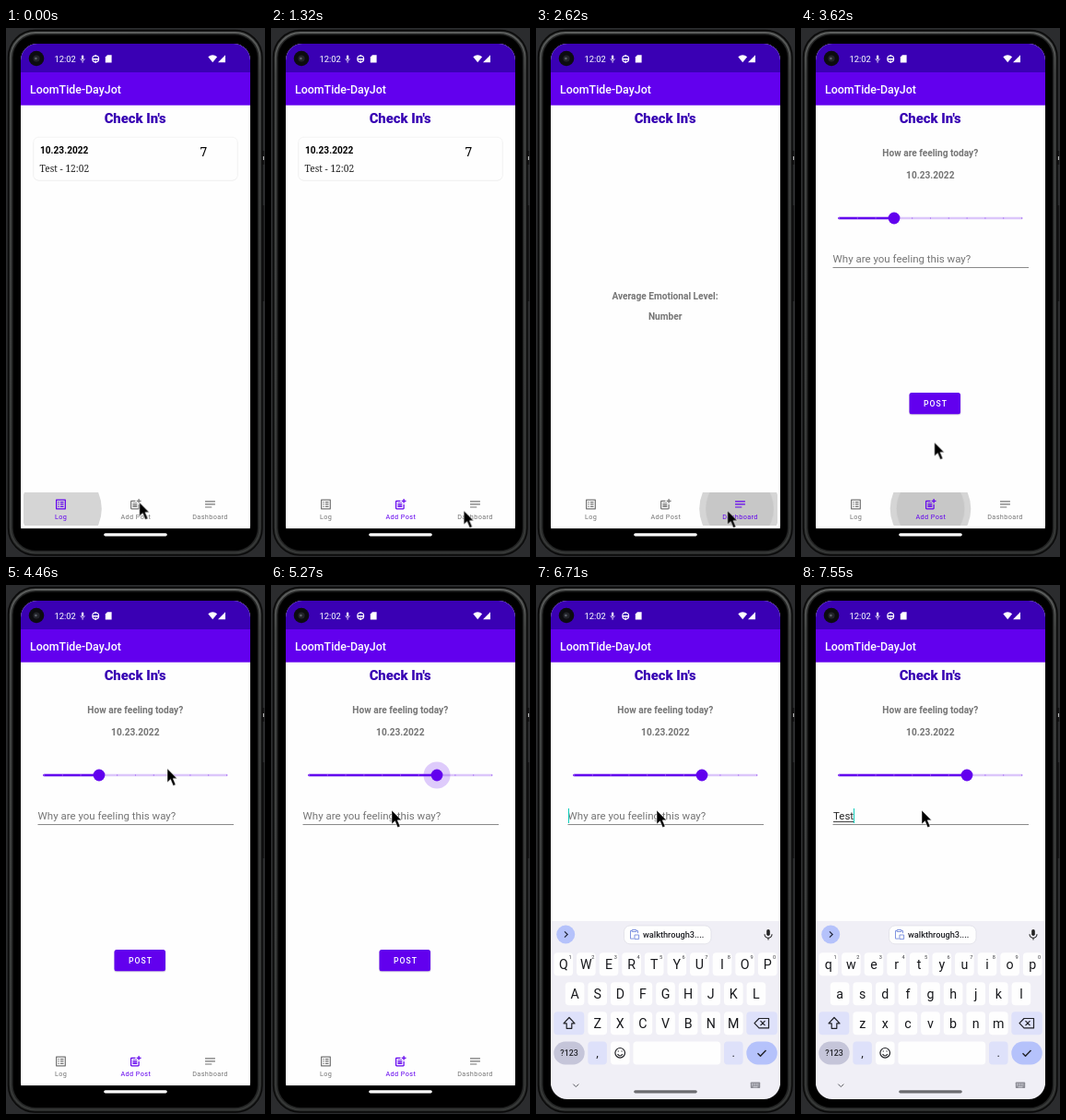
An HTML page for the animation above (8 s loop, 281 by 573 pixels).

```html
<!DOCTYPE html>
<html lang="en">
<head>
<meta charset="utf-8">
<title>Check In's</title>
<style>
html, body { margin: 0; width: 100%; height: 100%; overflow: hidden; background: #2b2c2e; }
body { position: relative; font-family: Roboto, "Open Sans", sans-serif; }
#stage { display: block; position: absolute; left: 0; top: 0; width: 281px; height: 573px; }
text { font-family: Roboto, "Open Sans", sans-serif; }
.mid { text-anchor: middle; }
.bold { font-weight: 700; font-size: 10.15px; }
.gray { fill: #757575; }
.serif { font-family: "Noto Serif", serif; }

.step { animation: 8s step-end infinite; }
.flow { animation: 8s linear infinite; }

/* pages */
#list { animation-name: list; }
#form { animation-name: form; }
#dash { animation-name: dash; }
@keyframes list { 0% { opacity: 1 } 18.125%, 100% { opacity: 0 } }
@keyframes form { 0% { opacity: 0 } 18.125% { opacity: 1 } 31.25% { opacity: 0 } 43.75%, 100% { opacity: 1 } }
@keyframes dash { 0% { opacity: 0 } 31.25% { opacity: 1 } 43.75%, 100% { opacity: 0 } }

/* bottom tabs */
.tab { fill: currentColor; color: #757575; }
.tab text { font-size: 7.27px; letter-spacing: .4px; text-anchor: middle; }
#tabLog { animation-name: tabLog; }
#tabAdd { animation-name: tabAdd; }
#tabDash { animation-name: tabDash; }
@keyframes tabLog { 0% { color: #6200ee } 11.75%, 100% { color: #757575 } }
@keyframes tabAdd { 0% { color: #757575 } 11.75% { color: #6200ee } 27.875% { color: #757575 } 42.5%, 100% { color: #6200ee } }
@keyframes tabDash { 0% { color: #757575 } 27.875% { color: #6200ee } 42.5%, 100% { color: #757575 } }

/* touch ripples */
.ripple { opacity: 0; animation: ripple 8s linear infinite; animation-delay: calc(var(--at) - 8s); }
.ripple circle { fill: #d5d5d5; }
.ripple .wave { fill: #c7c7c7; transform-box: fill-box; transform-origin: center; animation: wave 8s linear infinite; animation-delay: calc(var(--at) - 8s); }
#firstRipple { animation-name: lastFade; }
@keyframes ripple { 0% { opacity: 0 } .4%, 3.8% { opacity: 1 } 6%, 100% { opacity: 0 } }
@keyframes wave { 0% { transform: scale(.58) } 2.4%, 100% { transform: scale(1) } }
@keyframes lastFade { 0%, 1.5% { opacity: 1 } 3.375%, 100% { opacity: 0 } }

/* slider */
#active { animation-name: active; }
#thumb { animation-name: thumb; }
#halo { animation-name: halo; }
@keyframes active { 0% { width: 60px } 58.75%, 100% { width: 139px } }
@keyframes thumb { 0% { transform: translate(101px, 206px) } 58.75%, 100% { transform: translate(180px, 206px) } }
@keyframes halo { 0% { opacity: 0 } 58.75% { opacity: .2 } 67.75%, 100% { opacity: 0 } }

/* text field */
#hint { animation-name: hint; }
@keyframes hint { 0% { opacity: 1 } 85.375%, 100% { opacity: 0 } }
#field { position: absolute; left: 35px; top: 241.5px; height: 16px; display: flex; font-size: 11.5px; line-height: 16px; color: #262626; }
#word { height: 14px; border-bottom: 1px solid #444; }
#word span { animation: 8s step-end infinite; }
#caret { width: 1.3px; height: 16px; background: #10cdbb; animation-name: caret; }
@keyframes caret { 0% { opacity: 0 } 67.75%, 100% { opacity: 1 } }
@keyframes key1 { 0% { font-size: 0 } 85.375%, 100% { font-size: 11.5px } }
@keyframes key2 { 0% { font-size: 0 } 88.375%, 100% { font-size: 11.5px } }
@keyframes key3 { 0% { font-size: 0 } 91.375%, 100% { font-size: 11.5px } }
@keyframes key4 { 0% { font-size: 0 } 94.3%, 100% { font-size: 11.5px } }

/* keyboard */
#keyboard { animation-name: rise; }
@keyframes rise {
  0%, 73.1% { transform: translateY(193px); opacity: 0 }
  74.3%, 75.3% { transform: translateY(107px); opacity: .4 }
  76.6% { transform: translateY(32px); opacity: .85 }
  78.5%, 100% { transform: translateY(0); opacity: 1 }
}
.abc { font-size: 14.2px; text-anchor: middle; fill: #17181c; animation: caps 8s step-end infinite; }
.num { font-size: 5.6px; text-anchor: middle; fill: #3c3d42; }
@keyframes caps { 0% { text-transform: none } 83.875% { text-transform: uppercase } 86.875%, 100% { text-transform: none } }
#chip { animation-name: chip; }
@keyframes chip { 0%, 78.8% { opacity: 0 } 80%, 100% { opacity: 1 } }
#handle { animation-name: handle; }
@keyframes handle { 0% { fill: #fff } 83.875%, 100% { fill: #6c6c70 } }

/* mouse pointer */
#pointer { animation-name: pointer; }
@keyframes pointer {
  0%, 12.5% { transform: translate(144.7px, 513.8px) }
  16.25%, 26.375% { transform: translate(209.2px, 522.8px) }
  27.8%, 40.625% { transform: translate(207.7px, 522.8px) }
  42.25%, 43.1% { transform: translate(144.5px, 517px) }
  45.25%, 46.6% { transform: translate(144.7px, 448.8px) }
  52.375%, 53.875% { transform: translate(175px, 185px) }
  55.75%, 57.5% { transform: translate(175px, 198.8px) }
  58.75%, 61.25% { transform: translate(181px, 204px) }
  65.875%, 100% { transform: translate(131px, 244px) }
}
</style>
</head>
<body>
<svg id="stage" viewBox="0 0 281 573" width="281" height="573">
  <defs>
    <clipPath id="screen"><rect x="16" y="17" width="249" height="540" rx="18"/></clipPath>
    <clipPath id="bar"><rect x="19" y="503" width="243" height="35.5"/></clipPath>
    <linearGradient id="rim" x2="0" y2="1">
      <stop offset="0" stop-color="#5c5e5d"/><stop offset=".08" stop-color="#434544"/>
      <stop offset="1" stop-color="#363837"/>
    </linearGradient>
  </defs>

  <!-- phone body -->
  <rect width="281" height="573" fill="#2b2c2e"/>
  <path d="M279 133v15M279 192v104" stroke="#161617" stroke-width="2.4"/>
  <path d="M279.3 139v4" stroke="#b5b5b5" stroke-width="1.4"/>
  <rect x="2.5" y="2.5" width="275.5" height="568.5" rx="29" fill="#1c1d1d" stroke="#0a0a0a" stroke-width="1.4"/>
  <rect x="5" y="5" width="270.5" height="563.5" rx="27" fill="#222323" stroke="url(#rim)" stroke-width="2.2"/>
  <rect x="7.6" y="7.6" width="265.3" height="558.3" rx="24.5" fill="#000"/>

  <g clip-path="url(#screen)">
    <rect x="16" y="17" width="249" height="525.3" fill="#fefefe"/>
    <rect x="16" y="17" width="249" height="31" fill="#3a00b4"/>
    <rect x="16" y="48" width="249" height="35.7" fill="#6200ee"/>
    <rect x="16" y="542.3" width="249" height="15" fill="#000"/>

    <!-- status bar -->
    <circle cx="33" cy="33" r="8.3" fill="#0c0c10"/>
    <circle cx="33" cy="33" r="3.6" fill="#23242a"/>
    <circle cx="32.4" cy="33" r="1.3" fill="#5c616b"/>
    <g fill="#fff">
      <text x="52.5" y="37" font-size="9.4">12:02</text>
      <rect x="82" y="29.4" width="2.2" height="4.6" rx="1.1"/>
      <path d="M81 33.2a2.1 2.1 0 0 0 4.2 0M83.1 35.4v2.4" fill="none" stroke="#fff" stroke-width=".8"/>
      <circle cx="97.2" cy="33.4" r="3.4" fill="none" stroke="#fff" stroke-width="1.2"/>
      <path d="M94 33.8h6.4M97.2 29v2M97.2 35.6v2.4" stroke="#fff" stroke-width="1.4"/>
      <path d="M110 29.2h4.6v8.4h-6.8v-6.2z"/>
      <path d="M219.3 31.2q4.9-3.7 9.8 0l-4.9 6z"/>
      <path d="M238 29.2v8h-8z"/>
    </g>
    <text x="26" y="71" font-size="12.4" font-weight="500" fill="#fff">LoomTide-DayJot</text>
    <text class="mid" x="140.2" y="103.2" font-size="14.8" font-weight="800" fill="#3700b3">Check In's</text>

    <!-- log page -->
    <g id="list" class="step">
      <rect x="29.6" y="118.4" width="221.8" height="47.1" rx="6" fill="#e9e9e9"/>
      <rect x="29.8" y="118.2" width="221.4" height="46.8" rx="5.6" fill="#fefefe" stroke="#eee" stroke-width=".6"/>
      <text class="bold" x="37" y="136">10.23.2022</text>
      <text class="serif" x="36.6" y="156" font-size="10.2" fill="#222">Test - 12:02</text>
      <text class="serif mid" x="214.3" y="139.3" font-size="14.5" font-weight="500">7</text>
    </g>

    <!-- dashboard page -->
    <g id="dash" class="step">
      <text class="bold gray mid" x="140" y="294.2">Average Emotional Level:</text>
      <text class="bold gray mid" x="140.2" y="316.2">Number</text>
    </g>

    <!-- add page -->
    <g id="form" class="step">
      <text class="bold gray mid" x="140.3" y="138.7">How are feeling today?</text>
      <text class="bold gray mid" x="140.3" y="163">10.23.2022</text>
      <path d="M41.5 206H239.5" stroke="#dcc6fa" stroke-width="2.5" stroke-linecap="round"/>
      <rect id="active" class="step" x="40.2" y="204.75" width="60" height="2.5" rx="1.2" fill="#6200ee"/>
      <path d="M41.5 206H240" stroke="#a46ff5" stroke-width="1.3" stroke-linecap="round" stroke-dasharray="0 19.8"/>
      <g id="thumb" class="step" fill="#6200ee">
        <circle id="halo" class="step" r="14.5"/>
        <circle r="6.4"/>
      </g>
      <text id="hint" class="step gray" x="34.6" y="253.5" font-size="11.5">Why are you feeling this way?</text>
      <path d="M34.5 259.5H247" stroke="#7d7d7d" stroke-width=".9"/>
      <rect x="117.3" y="396" width="56" height="23.3" rx="2.6" fill="#d5d2dc"/>
      <rect x="117.5" y="395" width="55.5" height="23.2" rx="2.5" fill="#6200ee"/>
      <text class="mid" x="146" y="409.8" font-size="8.6" font-weight="500" letter-spacing="1" fill="#fff">POST</text>
    </g>

    <!-- bottom bar -->
    <g clip-path="url(#bar)">
      <g id="firstRipple" class="ripple" style="--at:0s"><circle cx="60" cy="520.7" r="43.8"/></g>
      <g class="ripple" style="--at:1.45s"><circle cx="140.5" cy="520.7" r="43.8"/><circle class="wave" cx="140.5" cy="520.7" r="43.8"/></g>
      <g class="ripple" style="--at:2.5s"><circle cx="221" cy="520.7" r="43.8"/><circle class="wave" cx="221" cy="520.7" r="43.8"/></g>
      <g class="ripple" style="--at:3.5s"><circle cx="140.5" cy="520.7" r="43.8"/><circle class="wave" cx="140.5" cy="520.7" r="43.8"/></g>
    </g>
    <g id="tabLog" class="tab step">
      <path transform="translate(52.2 508.7) scale(.606)" d="M19 5v14H5V5h14m1.1-2H3.9c-.5 0-.9.4-.9.9v16.2c0 .4.4.9.9.9h16.2c.4 0 .9-.5.9-.9V3.9c0-.5-.5-.9-.9-.9zM11 7h6v2h-6zM11 11h6v2h-6zM11 15h6v2h-6zM7 7h2v2H7zM7 11h2v2H7zM7 15h2v2H7z"/>
      <text x="59.7" y="532">Log</text>
    </g>
    <g id="tabAdd" class="tab step">
      <path transform="translate(133.2 508.7) scale(.606)" d="M17 19H5V7h7V5H5c-1.1 0-2 .9-2 2v12c0 1.1.9 2 2 2h12c1.1 0 2-.9 2-2v-7h-2zM19 2h-2v3h-3v2h3v3h2V7h3V5h-3zM7 9h8v2H7zM7 12h8v2H7zM7 15h8v2H7z"/>
      <text x="140.8" y="532">Add Post</text>
    </g>
    <g id="tabDash" class="tab step">
      <path transform="translate(214.2 508.7) scale(.606)" d="M3 6h18v2H3zM3 11h18v2H3zM3 16h12v2H3z"/>
      <text x="221.5" y="532">Dashboard</text>
    </g>

    <!-- keyboard -->
    <g id="keyboard" class="flow">
      <rect x="16" y="364" width="249" height="193" fill="#f0eff6"/>
      <circle cx="32.2" cy="378.5" r="10" fill="#b5c2fb"/>
      <path d="M31 375.3l3.2 3.2-3.2 3.2" fill="none" stroke="#22263a" stroke-width="1.2"/>
      <g id="chip" class="flow">
        <rect x="95.5" y="369" width="94.5" height="19.8" rx="6.5" fill="#fefefe" stroke="#dcdce4" stroke-width=".7"/>
        <path d="M104 374.5h-1.5v8.6h4M109 374.5h1.5v2.6M104.2 373.5h4.6v2h-4.6zM107 379h4.6v4.6H107z" fill="none" stroke="#8195e0" stroke-width="1"/>
        <text x="116" y="382" font-size="9.2" font-weight="500" fill="#202126">walkthrough3....</text>
      </g>
      <rect x="250.2" y="373" width="3.6" height="7" rx="1.8" fill="#222"/>
      <path d="M248 378.2a4 4 0 0 0 8 0M252 382.2v2.4" fill="none" stroke="#222" stroke-width="1.1"/>
      <g id="keys"></g>
      <g fill="none" stroke="#202126" stroke-width="1.2" stroke-linejoin="round">
        <path d="M36 468.5l-6 6.4h3.2v5.4h5.6v-5.4h3.2z"/>
        <path d="M242 469.5h10.5v10.4H242l-5-5.2zM243.5 472.2l5 5M248.5 472.2l-5 5"/>
        <circle cx="91.2" cy="506.8" r="5.3"/>
        <path d="M88.5 508.2q2.7 3.6 5.4 0"/>
        <path d="M89.3 504.4v1.2M93.1 504.4v1.2"/>
        <path d="M240.5 507.2l3 3 6-6.2" stroke-width="1.4"/>
      </g>
      <text class="mid" x="36" y="510.4" font-size="8.8" font-weight="500" fill="#26272d">?123</text>
      <text class="mid" x="66.5" y="511" font-size="13" fill="#202126">,</text>
      <text class="mid" x="214.3" y="511" font-size="13" fill="#202126">.</text>
      <path d="M40.3 540.6l3 3 3-3" fill="none" stroke="#55565c" stroke-width="1"/>
      <rect x="232.8" y="538.5" width="10.4" height="6.6" rx=".8" fill="#8b8b94"/>
      <path d="M234 540.4h8M234 542h8" stroke="#f0eff6" stroke-width=".7" stroke-dasharray="1 .6"/>
      <path d="M235.5 543.8h5" stroke="#f0eff6" stroke-width=".7"/>
    </g>
    <rect id="handle" class="step" x="106.2" y="547.2" width="68.6" height="3.2" rx="1.6" fill="#fff"/>
  </g>

  <path id="pointer" class="flow" d="M0 0V15L3.5 11.7L6.4 18.6L9.1 17.5L6.2 10.8H10.6Z" fill="#000" stroke="#fff" stroke-width=".5"/>
</svg>

<div id="field">
  <div id="word"><span style="animation-name:key1">T</span><span style="animation-name:key2">e</span><span style="animation-name:key3">s</span><span style="animation-name:key4">t</span></div>
  <div id="caret" class="step"></div>
</div>

<script>
const PITCH = 24.6, WHITE = "#fefefe", TINT = "#dee1fa";
const key = (x, y, w, fill, r = 4) =>
  `<rect x="${x}" y="${y}" width="${w}" height="25" rx="${r}" fill="${fill}"/>`;

function letters(chars, first, top, digits = "") {
  return [...chars].map((c, i) => {
    const x = first + i * PITCH;
    const num = digits ? `<text class="num" x="${x + 7.4}" y="${top + 7}">${digits[i]}</text>` : "";
    return key(x - 10.3, top, 20.6, WHITE) + `<text class="abc" x="${x}" y="${top + 17.4}">${c}</text>` + num;
  }).join("");
}

document.getElementById("keys").innerHTML =
  letters("qwertyuiop", 29.8, 398.3, "1234567890") +
  letters("asdfghjkl", 42.1, 430.3) +
  letters("zxcvbnm", 66.7, 462.3) +
  key(19.3, 462.3, 33, TINT) + key(228.3, 462.3, 33.5, TINT) +
  key(19.3, 494.5, 33.4, "#c5c5d9", 12.5) + key(56.3, 494.5, 20.6, TINT) +
  key(81, 494.5, 20.6, WHITE) + key(105.4, 494.5, 94.8, WHITE) +
  key(204, 494.5, 20.6, TINT) + key(228.3, 494.5, 33.5, "#b5c2fb", 12.5);
</script>
</body>
</html>
```
